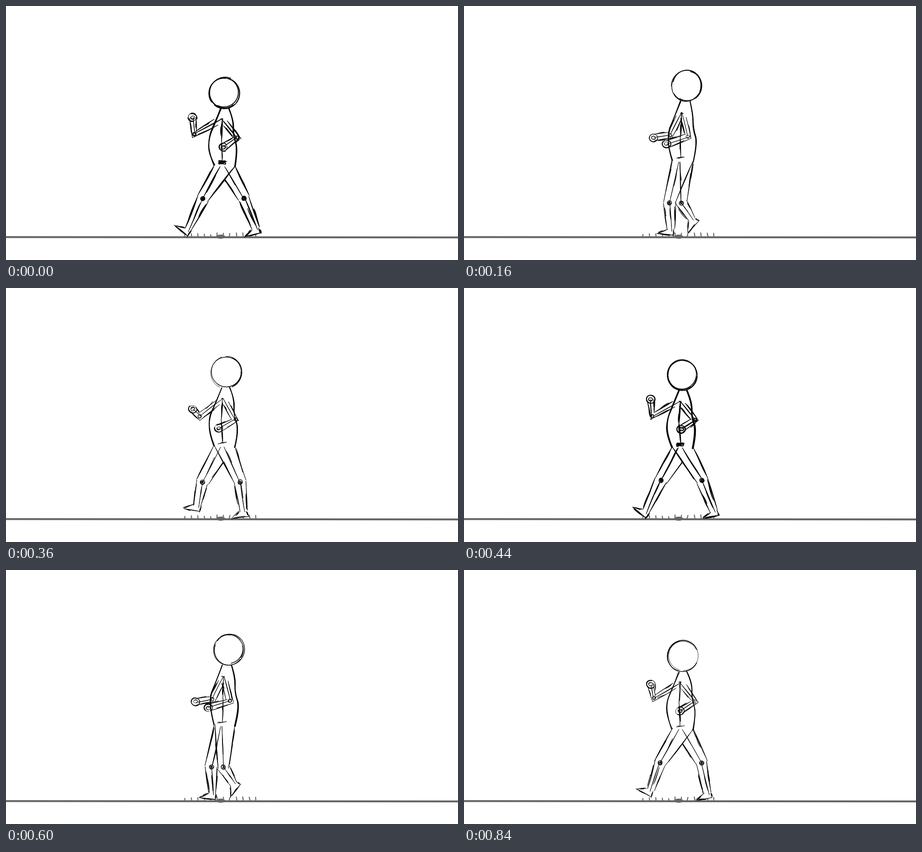
Recreate the animation shown at these times as an HTML page with a canvas. Size 998 by 561 pixels, loop 880 ms.

```html
<!DOCTYPE html>
<html lang="en">
<head>
<meta charset="utf-8">
<title>Walk cycle</title>
<style>
  html, body { margin: 0; width: 100%; height: 100%; overflow: hidden; background: #fff; }
  canvas { display: block; }
</style>
</head>
<body>
<canvas id="stage" width="998" height="561"></canvas>
<script>
const ctx = document.getElementById('stage').getContext('2d');
const STEP = 40, CYCLE = 22, HALF = CYCLE / 2;
const { cos, sin, PI, hypot, min } = Math;

let seed = 1, weight = 1;
const random = () => (seed = seed * 48271 % 2147483647) / 2147483647;
const shake = amount => (random() - .5) * 2 * amount;
const jitter = ([x, y], amount = 1.3) => [x + shake(amount), y + shake(amount)];
const mix = (a, b, u) => a.map((v, i) => v + (b[i] - v) * u);
const shift = (p, n, d) => [p[0] + n[0] * d, p[1] + n[1] * d];

// 1 when both feet touch the ground, -1 when the legs pass
const beatAt = step => cos(2 * PI * step / HALF);

function bodyPose(step) {
  const beat = beatAt(step);
  return {
    head: [488 - 6 * beat, 182 + 10 * beat],
    shoulder: [479 - 2 * beat, 241 + 8.5 * beat],
    hip: [477.5, 339.5 + 6 * beat]
  };
}

// Starts at heel strike: half a cycle on the ground, half swinging forward
function legPose(step) {
  const t = step % CYCLE, angle = 2 * PI * t / CYCLE, beat = beatAt(t);
  const swing = t / HALF - 1;
  const ankle = swing < 0
    ? [402 + 13.5 * t, 493]
    : [551 - 149 * (swing - .05 * sin(2 * PI * swing)), 492 - 22 * sin(PI * swing)];
  const knee = [472 - 46 * cos(angle + .14) + 8 * beat, 431 - 6 * beat];
  const pitch = .58 - .49 * cos(angle) - .34 * sin(angle) - .35 * beat;
  const foot = (a, length) => [ankle[0] - length * cos(a), min(509, ankle[1] + length * sin(a))];
  return { knee, ankle, toe: foot(pitch, 31), heel: foot(pitch + 1.75, 16) };
}

// Starts fully forward, with the fist raised
function armPose(step) {
  const c = cos(2 * PI * step / CYCLE), beat = beatAt(step);
  const raise = ((1 + c) / 2) ** 8;
  return {
    elbow: [470 - 47 * c - 7 * beat, 287 - 4 * c],
    hand: [438 - 34 * c + 8 * beat, 299 - 13 * c - 40 * raise]
  };
}

function normal(a, b) {
  const dx = b[0] - a[0], dy = b[1] - a[1], d = hypot(dx, dy) || 1;
  return [-dy / d, dx / d];
}

// Pen mark, thick in the middle and thin at the ends
function mark(a, b, width) {
  const n = normal(a, b), middle = jitter(mix(a, b, .3 + random() * .4), 1.5);
  const w = width * weight * (.3 + random() * .9);
  ctx.beginPath();
  ctx.moveTo(...a);
  ctx.quadraticCurveTo(...shift(middle, n, w), ...b);
  ctx.quadraticCurveTo(...shift(middle, n, -w), ...a);
  ctx.lineWidth = .8 * weight;
  ctx.fill();
  ctx.stroke();
}

function sketch(points, width = 1.5, passes = 3) {
  for (let pass = 0; pass < passes; pass++) {
    for (let i = 0; i + 1 < points.length; i++) {
      const from = pass ? random() * .5 : 0, to = pass ? from + .3 + random() * .3 : 1;
      const [a, b] = [from, to].map(u => jitter(mix(points[i], points[i + 1], u), 1.5));
      mark(a, b, width);
    }
  }
}

function curve(points) {
  for (let pass = 0; pass < 3; pass++) {
    const p = points.map(q => jitter(q, 1.5));
    ctx.lineWidth = weight * (.9 + random());
    ctx.beginPath();
    ctx.moveTo(...p[0]);
    for (let i = 1; i < p.length - 1; i++) {
      const end = i === p.length - 2 ? p[i + 1] : mix(p[i], p[i + 1], .5);
      ctx.quadraticCurveTo(...p[i], ...end);
    }
    ctx.stroke();
  }
}

function loop(center, rx, ry = rx, passes = 3) {
  for (let pass = 0; pass < passes; pass++) {
    const start = random() * 7;
    ctx.lineWidth = weight * (.8 + random() * .9);
    ctx.beginPath();
    ctx.ellipse(...jitter(center, rx * .03 + .6), rx * (1 + shake(.04)), ry * (1 + shake(.04)),
      shake(.5), start, start + (pass ? 1.5 + random() * 3 : 6));
    ctx.stroke();
  }
}

// One side of a two-bone limb
function edge([a, b, c], widths, side) {
  const n1 = normal(a, b), n2 = normal(b, c), sum = mix(n1, n2, .5);
  const d = hypot(...sum) || 1;
  const normals = [n1, sum.map(v => v / d), n2];
  return [a, b, c].map((p, i) => shift(p, normals[i], widths[i] * side));
}

function leg(hip, { knee, ankle, toe, heel }) {
  const bones = [hip, knee, ankle];
  const front = edge(bones, [0, 13, 8], 1), back = edge(bones, [0, 13, 8], -1);
  front[0] = [hip[0] - 17, hip[1] + 5];
  back[0] = [hip[0] + 28, hip[1] + 8];
  ctx.beginPath();
  for (const p of [...front, toe, heel, ...back.slice().reverse()]) ctx.lineTo(...p);
  ctx.save();
  ctx.fillStyle = '#fff';
  ctx.fill();
  ctx.restore();
  sketch(front);
  sketch(back);
  sketch([front[2], toe, heel, back[2]]);
}

function legBones(hip, { knee, ankle, heel }) {
  sketch([mix(hip, knee, .1), knee, mix(ankle, heel, .3)], 1.3, 2);
  loop(knee, 4.5);
  loop(knee, 2);
}

function arm(shoulder, { elbow, hand }) {
  const bones = [mix(shoulder, elbow, .22), elbow, hand];
  for (const side of [1, -1]) sketch(edge(bones, [7, 8, 8], side), 1.4, 2);
  sketch([shoulder, elbow, hand], 1.2, 1);
  loop(elbow, 3.5);
  loop(hand, 9.5, 8.5);
  loop(hand, 4.5, 3.5, 2);
}

function torso({ head: [hx, hy], shoulder: [sx, sy], hip: [px, py] }) {
  const neck = hy + 34, lean = hx - 481;
  curve([[474 + lean * .35, neck], [sx - 19, sy + 16], [sx - 29, sy + 40],
    [sx - 30, sy + 74], [px - 18, py + 6]]);
  curve([[491 + lean * .65, neck], [sx + 26, sy + 2], [sx + 25, sy + 36],
    [sx + 36, sy + 66], [px + 28, py + 9]]);
  sketch([[sx, sy], [sx - 2, (sy + py) / 2], [px, py]], 1.6);
  sketch([[sx - 4, sy], [sx + 4, sy + 1]], 1.2, 1);
  sketch([[px - 9, py + 1], [px + 9, py - 1]], 1.2, 2);
}

function ground() {
  ctx.strokeStyle = ctx.fillStyle = '#666';
  const line = (x1, y1, x2, y2, width) => {
    ctx.lineWidth = width;
    ctx.beginPath();
    ctx.moveTo(x1, y1);
    ctx.lineTo(x2, y2);
    ctx.stroke();
  };
  line(-5, 510.4, 1003, 511.1, 4.4);
  seed = 4321;
  for (let x = 395; x < 555; x += 14.2) line(x, 505 - random() * 4, x + shake(2), 509, 2.2);
  ctx.beginPath();
  ctx.ellipse(474, 509.5, 10, 4.5, 0, 0, 7);
  ctx.fill();
}

function draw(step) {
  const contact = step % HALF === 0;
  ctx.fillStyle = '#fff';
  ctx.fillRect(0, 0, 998, 561);
  ctx.lineCap = ctx.lineJoin = 'round';
  ground();

  seed = 7919 * (step + 3);
  weight = contact ? 1.4 : 1;
  ctx.strokeStyle = ctx.fillStyle = '#050505';
  const body = bodyPose(step), { head, shoulder, hip } = body;
  const near = legPose(step), far = legPose(step + HALF);
  leg(hip, far);
  leg(hip, near);
  legBones(hip, far);
  legBones(hip, near);
  torso(body);
  arm(shoulder, armPose(step));
  arm(shoulder, armPose(step + HALF));
  loop(head, 33, 33.5, 5);
  if (contact) loop(hip, 8, 2.5, 6);
}

function tick(now) {
  draw(Math.floor(now / STEP) % CYCLE);
  requestAnimationFrame(tick);
}
tick(performance.now());
</script>
</body>
</html>
```
